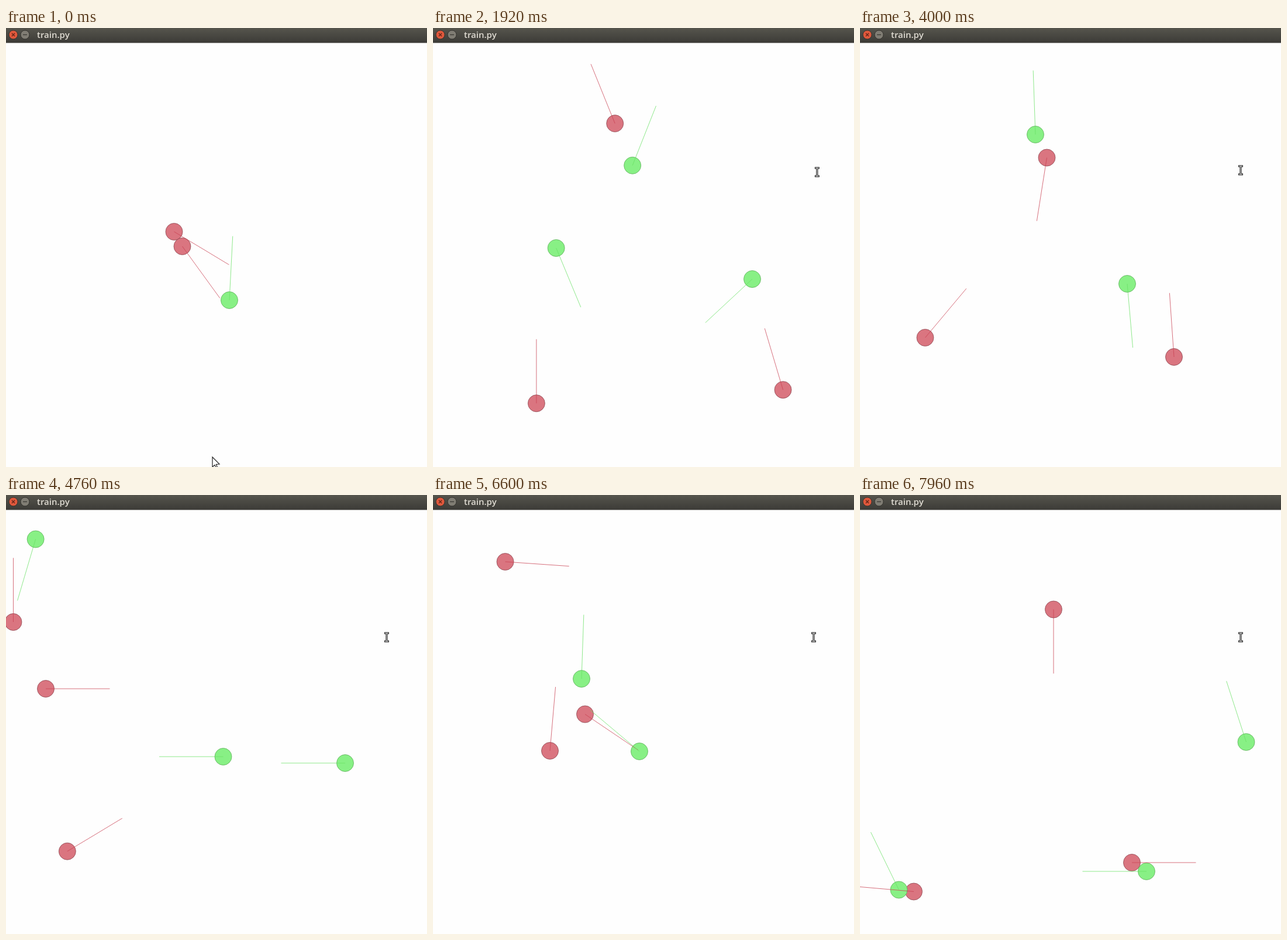
An HTML page with a canvas that plays this animation: 720x750 px, repeating every 8000 ms.

```html
<!DOCTYPE html>
<html lang="en">
<head>
<meta charset="utf-8">
<title>train.py</title>
<style>
  html, body { margin: 0; width: 100%; height: 100%; overflow: hidden; background: #fefefe; }
  canvas { display: block; }
</style>
</head>
<body>
<canvas id="stage" width="720" height="750"></canvas>
<script>
const ctx = document.getElementById('stage').getContext('2d');
const LOOP = 8000, STEP = 40;
const RADIUS = 14.5, BEAM = 109.5;
const COAST = 0.06;      // px per ms along the heading, before the first and after the last pose
const LAST_BREATH = 500; // ms that a tagged agent stays after its last pose

const RED = { fill: '#da7580', edge: 'rgba(130,62,72,0.7)', beam: 'rgba(200,65,82,0.75)' };
const GREEN = { fill: '#88f085', edge: 'rgba(85,165,80,0.7)', beam: 'rgba(105,225,100,0.75)' };

// A pose is [x, y, heading in degrees].
const red = (...poses) => ({ team: RED, poses });
const green = (...poses) => ({ team: GREEN, poses });

// Each agent passes its poses at the times of its episode; one with fewer poses is tagged out.
const episodes = [
  { end: 440, times: [0], agents: [
    red([287.5, 348, 31]),
    red([301.5, 373, 54]),
    green([382, 465, -87])
  ] },
  { end: 4600, times: [1200, 2760, 4000], agents: [
    red([262.5, 254.5, -53], [368, 56.5, -181], [319.5, 221.5, -261]),
    red([268.5, 607.5, -90], [70, 680.5, -90], [111.5, 529, -50]),
    red([617.5, 515, -90], [576.5, 738.5, -126], [537, 562, -94]),
    green([457, 191, -127], [206, 286, 0], [300, 182, -92]),
    green([299.5, 300, 48], [107, 464.5, 90]),
    green([564, 494, 180], [525, 353, 87], [457, 437, 85])
  ] },
  { end: 6840, times: [5560, 6600], agents: [
    red([12.5, 169, -90], [123.5, 114, 4]),
    red([116, 331, 0], [260, 374.5, 34]),
    red([146, 584, -31], [200, 437, -85]),
    green([37, 121.5, 106.5]),
    green([323.5, 447, 180], [254, 314, 272]),
    green([532, 458, 180], [353, 438, 220])
  ] },
  { end: LOOP, times: [7960], agents: [
    red([331, 195.5, 90]),
    red([465, 628, 0]),
    red([92, 677.5, 185]),
    green([660.5, 422, -108]),
    green([66.5, 674.5, -116]),
    green([490, 643, 180])
  ] }
];

const pauses = [[2480, 2600], [2760, 2880], [6600, 6680], [6760, 6840]];

function gameTime(t) {
  const stepped = Math.floor(t / STEP) * STEP;
  const pause = pauses.find(([from, to]) => stepped >= from && stepped < to);
  return pause ? pause[0] : stepped;
}

const place = (x, y, degrees) => ({ x, y, angle: degrees * Math.PI / 180 });

function ahead({ x, y, angle }, distance) {
  return { x: x + distance * Math.cos(angle), y: y + distance * Math.sin(angle), angle };
}

function locate(poses, times, t) {
  const last = poses.length - 1;
  if (t < times[0]) return ahead(place(...poses[0]), (t - times[0]) * COAST);
  if (t >= times[last]) return ahead(place(...poses[last]), (t - times[last]) * COAST);
  const i = times.findIndex(time => time > t) - 1;
  const k = (t - times[i]) / (times[i + 1] - times[i]);
  return place(...poses[i].map((value, n) => value + (poses[i + 1][n] - value) * k));
}

function disc(x, y, r, fill, edge) {
  ctx.beginPath();
  ctx.arc(x, y, r, 0, 2 * Math.PI);
  ctx.fillStyle = fill;
  ctx.fill();
  ctx.strokeStyle = edge;
  ctx.lineWidth = 1;
  ctx.stroke();
}

function line(x1, y1, x2, y2, color, width = 1) {
  ctx.beginPath();
  ctx.moveTo(x1, y1);
  ctx.lineTo(x2, y2);
  ctx.strokeStyle = color;
  ctx.lineWidth = width;
  ctx.stroke();
}

function drawAgents(t) {
  const { times, agents } = episodes.find(episode => t < episode.end);
  const shown = agents
    .filter(({ poses }) => poses.length === times.length || t < times[poses.length - 1] + LAST_BREATH)
    .map(({ team, poses }) => ({ team, at: locate(poses, times, t) }));
  for (const { team, at } of shown) disc(at.x, at.y, RADIUS, team.fill, team.edge);
  for (const { team, at } of shown) {
    const tip = ahead(at, BEAM);
    line(at.x, at.y, tip.x, tip.y, team.beam);
  }
}

function drawArrow(x, y) {
  ctx.save();
  ctx.translate(x, y);
  const outline = new Path2D('M0 0V17L4 13.5L7 20L9 19L6.5 12.5L12 12Z');
  ctx.fillStyle = '#fff';
  ctx.fill(outline);
  ctx.strokeStyle = '#222';
  ctx.lineWidth = 1.2;
  ctx.stroke(outline);
  ctx.restore();
}

function drawTextCursor(x, y) {
  for (const [color, width, reach] of [['#222', 3.2, 4], ['#eee', 1, 3]]) {
    line(x, y - 7, x, y + 7, color, width);
    for (const edge of [y - 7, y + 7]) line(x - reach, edge, x + reach, edge, color, width);
  }
}

// The arrow leaves at the bottom; a text cursor glides in from the right.
function drawPointer(t) {
  if (t < 320) drawArrow(353, 733 + t / 16);
  if (t < 1560) return;
  const rest = (1 - Math.min(1, (t - 1560) / 500)) ** 2;
  drawTextCursor(651 + 75 * rest, 243 + 40 * rest);
}

function drawTitleBar() {
  const shade = ctx.createLinearGradient(0, 0, 0, 25);
  shade.addColorStop(0, '#56554d');
  shade.addColorStop(1, '#3c3b37');
  ctx.fillStyle = shade;
  ctx.fillRect(0, 0, 720, 25.5);

  disc(12.5, 11.5, 7.5, '#e0583c', '#38332e');
  line(10, 9, 15, 14, '#5c2418', 1.3);
  line(15, 9, 10, 14, '#5c2418', 1.3);
  disc(32.5, 11.5, 7.5, '#807d74', '#34332f');
  line(29, 11.5, 36, 11.5, '#3a3934', 1.3);

  ctx.font = '600 15px "Open Sans", "Noto Sans", sans-serif';
  ctx.fillStyle = '#dfdbd2';
  ctx.fillText('train.py', 53, 17);
}

const start = performance.now();

function frame() {
  const t = gameTime((performance.now() - start) % LOOP);
  ctx.fillStyle = '#fefefe';
  ctx.fillRect(0, 0, 720, 750);
  drawAgents(t);
  drawPointer(t);
  drawTitleBar();
  requestAnimationFrame(frame);
}

frame();
</script>
</body>
</html>
```
